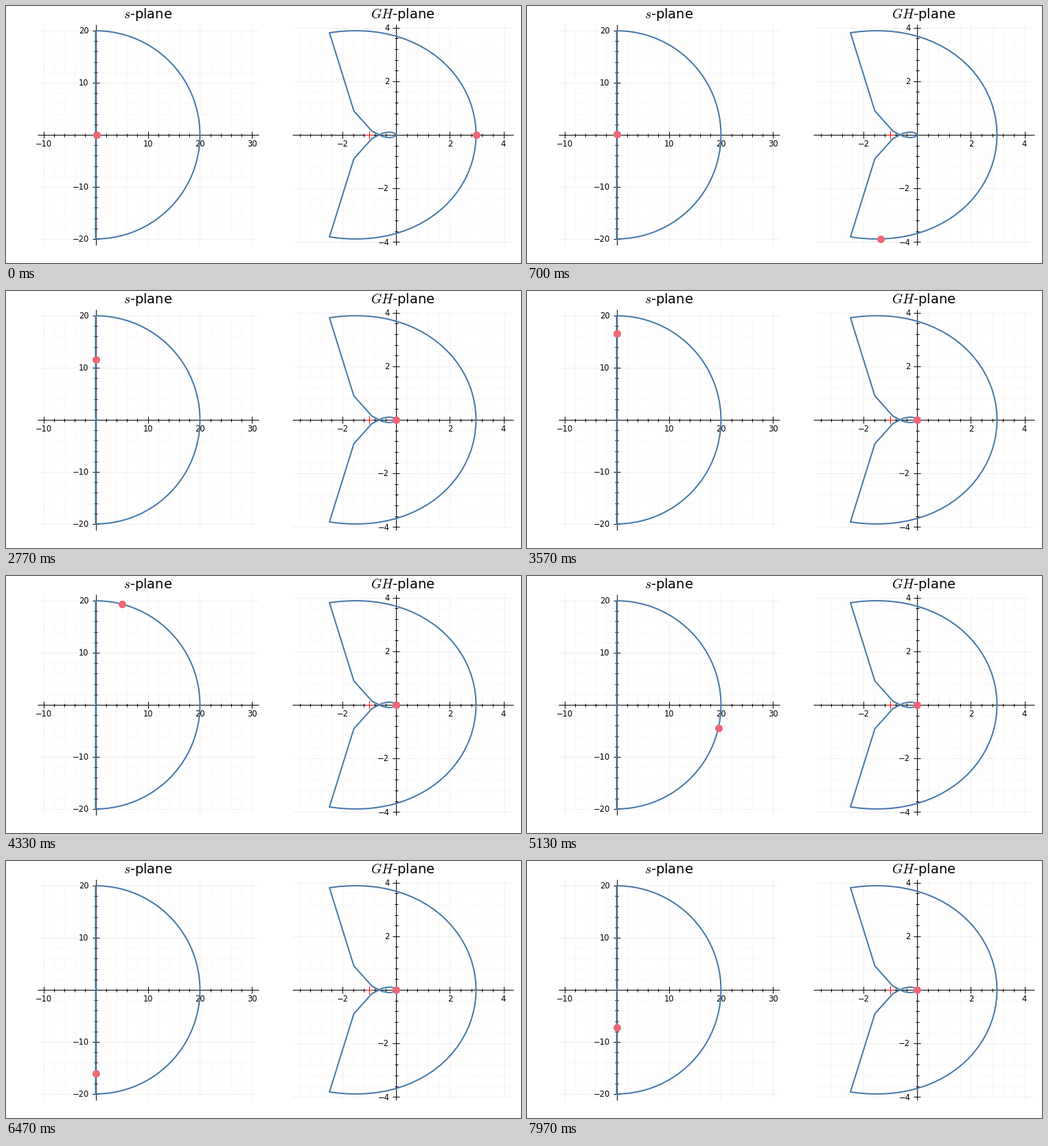
These frames come from a looping animation (750x375 px, 8000 ms). A matplotlib script:

```python
import numpy as np
import matplotlib.pyplot as plt
from matplotlib.animation import FuncAnimation

W, H, DPI = 750, 375, 100
FRAMES, LOOP_MS = 240, 8000
PT = 72 / DPI  # points per pixel
BLUE, PINK = "#4477aa", "#ee6677"
TOP, BOTTOM = 27, 349
R_SMALL, R_BIG = 0.2, 20

plt.rcParams["font.family"] = "DejaVu Sans"
plt.rcParams["mathtext.fontset"] = "cm"

fig = plt.figure(figsize=(W / DPI, H / DPI), dpi=DPI, facecolor="white")
ax = fig.add_axes([0, 0, 1, 1])
ax.set_xlim(0, W)
ax.set_ylim(H, 0)
ax.axis("off")


def contour():
    """Nyquist contour, starting on the real axis right of the origin."""
    quarter = R_SMALL * np.exp(1j * np.linspace(0, np.pi / 2, 25))
    low = 1j * np.linspace(R_SMALL, 10, 50)
    high = 1j * np.linspace(10, R_BIG, 50)
    arc = R_BIG * np.exp(1j * np.linspace(np.pi / 2, -np.pi / 2, 50))
    up = np.concatenate([quarter, low, high])
    return np.concatenate([up, arc, up[::-1].conj()])


def loop_gain(s):
    return 1 / (s * (s + 1) * (2 * s + 1))


class Plane:
    def __init__(self, left, right, x0, y0, scale, step, title):
        self.left, self.right = left, right
        self.x0, self.y0, self.scale = x0, y0, scale
        self.draw_axes(step)
        ax.text((left + right) / 2, 18, title, size=14, ha="center",
                va="baseline", zorder=3)

    def to_px(self, z):
        return self.x0 + self.scale * np.real(z), self.y0 - self.scale * np.imag(z)

    def line(self, xs, ys, color="black", width=1.0, z=2):
        ax.plot(xs, ys, color=color, lw=width * PT, zorder=z,
                solid_capstyle="butt")

    def draw_axes(self, step):
        minor = step / 5
        for k in range(-20, 21):
            major = k % 5 == 0
            half = 5 if major else 2.5
            shade = "#f0f0f0" if major else "#f8f8f8"
            label = f"{k * minor:.0f}".replace("-", "\u2212")
            x, _ = self.to_px(k * minor)
            _, y = self.to_px(1j * k * minor)
            if self.left <= x <= self.right:
                self.line([x, x], [TOP, BOTTOM], shade, z=1)
                if k:
                    self.line([x, x], [self.y0 - half, self.y0 + half])
                if k and major:
                    ax.text(x, 205.2, label, size=8.3, ha="center",
                            va="baseline", zorder=3)
            if TOP <= y <= BOTTOM:
                self.line([self.left, self.right], [y, y], shade, z=1)
                if k:
                    self.line([self.x0 - half, self.x0 + half], [y, y])
                if k and major:
                    ax.text(self.x0 - 10, y + 4.3, label, size=8.3, ha="right",
                            va="baseline", zorder=3)
        self.line([self.left, self.right], [self.y0, self.y0])
        self.line([self.x0, self.x0], [TOP, BOTTOM])

    def draw_curve(self, z):
        ax.plot(*self.to_px(z), color=BLUE, lw=2 * PT, zorder=5,
                solid_joinstyle="round")
        self.dot, = ax.plot([], [], "o", color=PINK, ms=11 * PT, mew=0, zorder=7)
        self.points = z

    def move(self, i):
        x, y = self.to_px(self.points[i])
        self.dot.set_data([x], [y])
        return self.dot


s = contour()
s_plane = Plane(46, 368, 130.6, 188, 7.594, 10, "$s$-plane")
gh_plane = Plane(417, 739, 568.2, 188, 39.08, 2, "$GH$-plane")
s_plane.draw_curve(s)
gh_plane.draw_curve(loop_gain(s))

cx, cy = gh_plane.to_px(-1)
ax.plot([cx], [cy], "+", color="red", ms=12 * PT, mew=1 * PT, zorder=6)


def update(i):
    return s_plane.move(i), gh_plane.move(i)


anim = FuncAnimation(fig, update, frames=FRAMES, init_func=lambda: update(0),
                     interval=LOOP_MS / FRAMES, repeat=True, repeat_delay=0,
                     blit=True)
plt.show()
```
